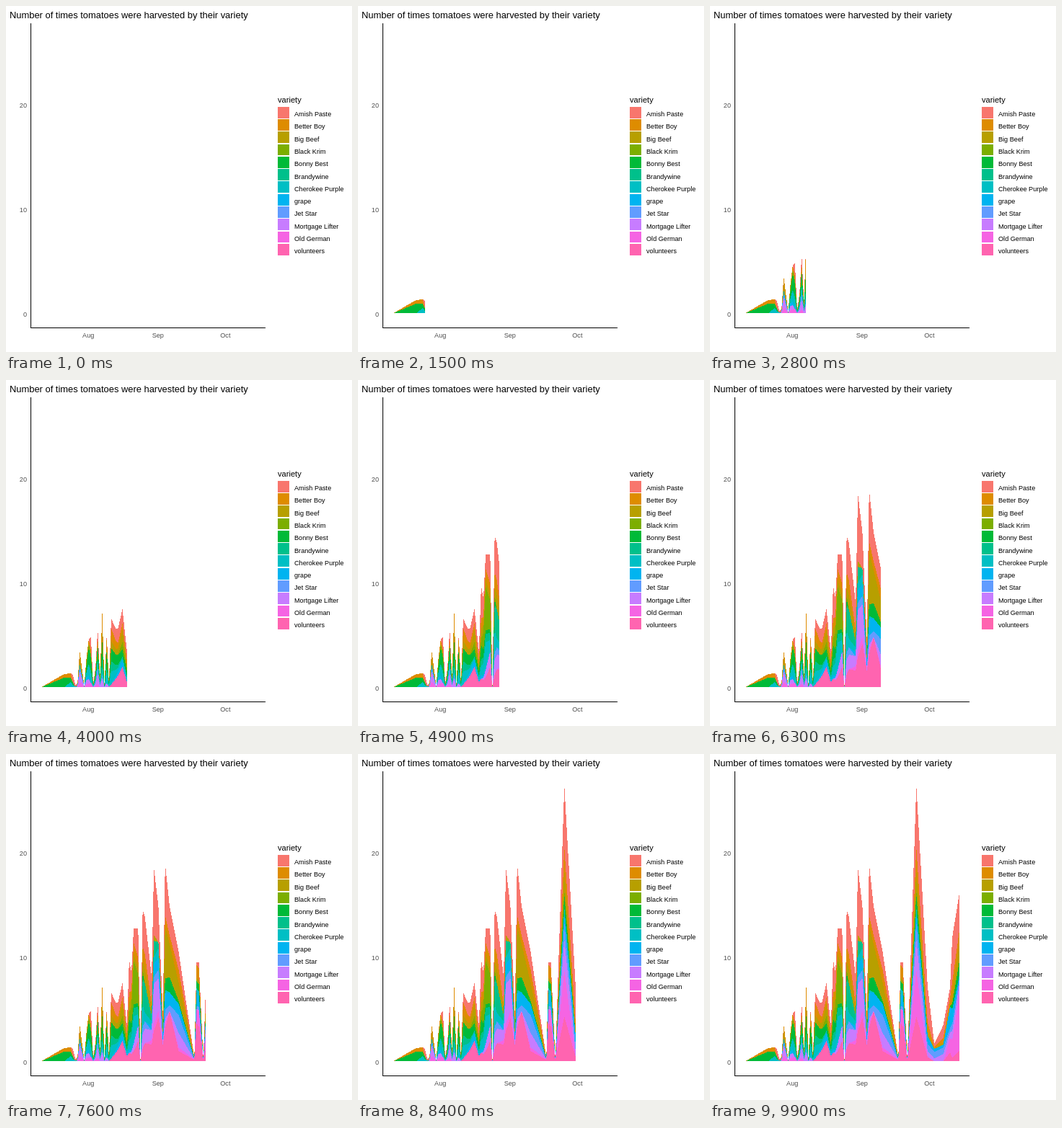
An HTML page that plays this animation: 480 by 480 pixels, repeating every 10000 ms.

```html
<!DOCTYPE html>
<html lang="en">
<head>
<meta charset="utf-8">
<style>
  html, body { margin: 0; width: 100%; height: 100%; overflow: hidden; background: #fff; }
  svg { display: block; font: 9.15px "Liberation Sans", Arial, sans-serif; }
  .axis { fill: #4d4d4d; }
</style>
</head>
<body>
<svg id="chart" width="480" height="480" viewBox="0 0 480 480">
  <clipPath id="reveal"><rect id="window" x="0" y="0" width="0" height="480"/></clipPath>
  <text x="5" y="17" font-size="12.92">Number of times tomatoes were harvested by their variety</text>
  <text x="377" y="134" font-size="11.1">variety</text>
  <g id="areas" clip-path="url(#reveal)" shape-rendering="crispEdges"></g>
  <path d="M34.5 24V446.5H360" fill="none" stroke="#000" shape-rendering="crispEdges"/>
</svg>
<script>
const varieties = [
  ['a', 'Amish Paste', '#F8766D'],
  ['b', 'Better Boy', '#DE8C00'],
  ['c', 'Big Beef', '#B79F00'],
  ['k', 'Black Krim', '#7CAE00'],
  ['n', 'Bonny Best', '#00BA38'],
  ['w', 'Brandywine', '#00C08B'],
  ['p', 'Cherokee Purple', '#00BFC4'],
  ['g', 'grape', '#00B4F0'],
  ['j', 'Jet Star', '#619CFF'],
  ['m', 'Mortgage Lifter', '#C77CFF'],
  ['o', 'Old German', '#F564E3'],
  ['v', 'volunteers', '#FF64B0']
];

// Total height of the stack: [day, y]
const outline = [
  [0, 426], [10, 408], [13, 407], [14, 409], [15, 423], [16, 421], [17, 376], [19, 424],
  [20, 385], [21, 360], [22, 357], [23, 422], [24, 399], [25, 346], [26, 411], [27, 324],
  [28, 423], [29, 353], [30, 420], [31, 331], [33, 345], [34, 345], [36, 318], [38, 376],
  [39, 286], [40, 303], [41, 242], [43, 242], [44, 424], [45, 216], [46, 226], [49, 309],
  [50, 158], [52, 211], [54, 360], [55, 152], [57, 212], [61, 274], [68, 421], [69, 289],
  [70, 289], [72, 423], [76, 44], [81, 322], [84, 402], [88, 376], [91, 324], [92, 254], [95, 196]
];

// Relative share of each variety, blended between these days
const mixes = {
  0: { b: 2, n: 8 },
  10: { b: 5, n: 13 },
  13: { b: 6, n: 6, p: 7 },
  14: { a: 11, n: 3, p: 3 },
  15: { a: 3, p: 1 },
  17: { b: 9, c: 10, g: 5, j: 4, m: 14, o: 8 },
  21: { b: 6, k: 6, n: 22, p: 16, g: 5, m: 6, o: 5 },
  22: { a: 18, b: 6, k: 4, n: 18, w: 6, p: 11, o: 6 },
  25: { a: 12, b: 10, n: 20, p: 11, j: 8, m: 14, o: 5 },
  27: { b: 28, c: 12, n: 25, w: 10, p: 11, j: 4, m: 12 },
  29: { a: 3, b: 18, n: 25, p: 20, m: 6 },
  31: { a: 13, b: 18, c: 10, n: 18, w: 14, p: 18, v: 4 },
  34: { a: 20, b: 8, c: 8, n: 14, w: 4, p: 5, g: 6, v: 16 },
  36: { a: 20, b: 10, c: 16, k: 10, n: 10, p: 4, g: 10, v: 28 },
  39: { a: 44, b: 15, c: 14, k: 8, n: 20, w: 10, p: 12, g: 5, v: 12 },
  41: { a: 20, b: 15, c: 10, k: 60, n: 5, w: 12, p: 35, g: 3, m: 10, v: 14 },
  43: { a: 40, b: 15, c: 8, k: 40, n: 5, w: 10, p: 15, m: 22, v: 28 },
  45: { a: 50, b: 20, c: 12, k: 6, n: 8, w: 36, p: 30, j: 10, m: 20, v: 18 },
  46: { a: 52, b: 20, c: 20, w: 40, p: 12, j: 10, m: 20, v: 25 },
  49: { a: 38, b: 6, c: 10, w: 8, p: 6, g: 6, m: 14, o: 6, v: 23 },
  50: { a: 93, c: 8, w: 22, p: 10, g: 18, j: 10, m: 55, o: 10, v: 42 },
  52: { a: 50, w: 8, p: 14, g: 16, j: 12, m: 45, o: 10, v: 60 },
  54: { a: 10, c: 18, g: 10, m: 6, v: 22 },
  55: { a: 72, b: 15, c: 72, n: 16, p: 4, g: 24, j: 12, m: 6, o: 8, v: 45 },
  57: { a: 40, b: 12, c: 46, n: 21, g: 18, j: 8, v: 70 },
  61: { a: 25, b: 18, c: 25, n: 4, g: 15, j: 25, m: 20, o: 5, v: 14 },
  69: { a: 4, b: 18, c: 4, n: 10, p: 8, g: 16, j: 4, o: 20, v: 52 },
  76: { a: 85, b: 32, c: 28, k: 6, n: 18, p: 8, g: 12, j: 24, m: 42, o: 64, v: 62 },
  81: { a: 50, b: 12, c: 6, g: 12, j: 10, m: 8, v: 6 },
  84: { a: 4, b: 3, g: 4, j: 9, m: 4 },
  88: { a: 18, b: 6, c: 3, g: 4, j: 9, m: 10 },
  91: { a: 14, b: 12, g: 30, j: 6, m: 8, o: 20, v: 12 },
  92: { a: 62, b: 20, c: 10, n: 8, g: 20, j: 10, m: 12, o: 25, v: 5 },
  95: { a: 52, b: 18, c: 24, n: 18, w: 2, g: 4, j: 8, m: 15, o: 75, v: 14 }
};

const lastDay = 95, lastStep = 99, base = 426.3;
const $ = id => document.getElementById(id);
const dayX = day => 49.3 + 3.118 * day;
const dayStep = day => Math.round(day * lastStep / lastDay);
const mixDays = Object.keys(mixes).map(Number);

function add(parent, tag, attrs, text = '') {
  const el = document.createElementNS('http://www.w3.org/2000/svg', tag);
  for (const name in attrs) el.setAttribute(name, attrs[name]);
  el.textContent = text;
  parent.append(el);
}

function share(key, day) {
  const part = d => (mixes[d][key] || 0) / Object.values(mixes[d]).reduce((s, v) => s + v, 0);
  const i = Math.max(1, mixDays.findIndex(d => d >= day));
  const from = mixDays[i - 1], to = mixDays[i];
  return part(from) + (part(to) - part(from)) * (day - from) / (to - from);
}

// Each area reaches down to the base; the next one covers its lower part.
const left = outline.map(() => 1);
varieties.forEach(([key, name, fill], i) => {
  const line = outline.map(([day, y], j) => {
    const top = base - (base - y) * left[j];
    left[j] -= share(key, day);
    return `${dayX(day)},${top}`;
  });
  add($('areas'), 'polygon', {
    points: `${line.join(' ')} ${dayX(lastDay)},${base} ${dayX(0)},${base}`, fill
  });
  const y = 139.8 + 17.28 * i;
  add($('chart'), 'rect', { x: 377, y, width: 16, height: 15.8, fill, 'shape-rendering': 'crispEdges' });
  add($('chart'), 'text', { x: 400, y: y + 13.3 }, name);
});

[0, 10, 20].forEach(v =>
  add($('chart'), 'text', { x: 29, y: 431 - 14.5 * v, 'text-anchor': 'end', class: 'axis' }, v));
[['Aug', 21], ['Sep', 52], ['Oct', 82]].forEach(([month, day]) =>
  add($('chart'), 'text', { x: dayX(day) - .6, y: 460, 'text-anchor': 'middle', class: 'axis' }, month));

// Harvest days snap to whole steps; the edge moves evenly between them.
function edge(step) {
  const i = Math.max(1, outline.findIndex(([day]) => dayStep(day) >= step));
  const from = outline[i - 1][0], to = outline[i][0];
  const part = (step - dayStep(from)) / (dayStep(to) - dayStep(from));
  return Math.round(dayX(from + (to - from) * part));
}

function draw() {
  const step = Math.floor(performance.now() / 100) % (lastStep + 1);
  $('window').setAttribute('width', edge(step));
  requestAnimationFrame(draw);
}
draw();
</script>
</body>
</html>
```
